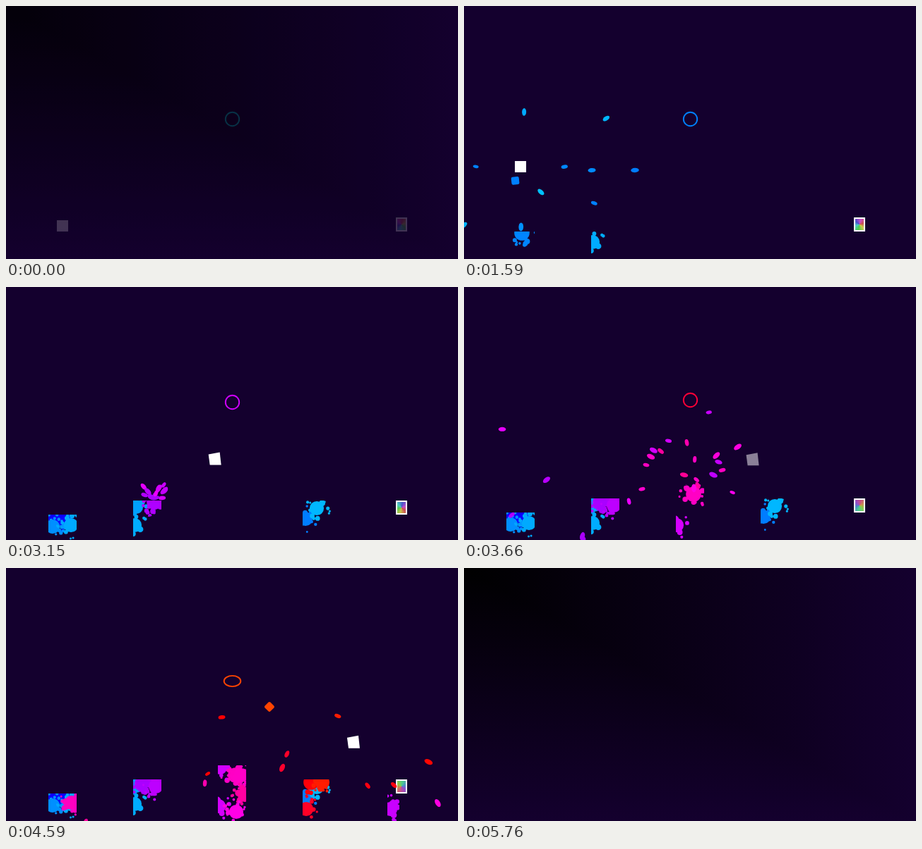
An HTML page with a canvas that plays this animation: 640x359 px, repeating every 5.79 s.

```html
<!DOCTYPE html>
<html lang="en">
<head>
<meta charset="utf-8">
<title>Paint platforms</title>
<style>
  html, body { margin: 0; width: 100%; height: 100%; overflow: hidden; }
  body {
    background: linear-gradient(90deg, #000, #14002e), linear-gradient(#000, #14002e);
    background-blend-mode: lighten;
  }
  canvas { display: block; width: 100vw; height: 100vh; }
</style>
</head>
<body>
<canvas id="stage" width="640" height="359"></canvas>
<script>
const LOOP = 5790, STEP = 30, GRAVITY = 0.0006, TAU = Math.PI * 2;
const RING = { x: 320.5, y: 160.5 };
const stage = document.getElementById('stage');
const g = stage.getContext('2d');

const rnd = n => {
  const s = Math.sin(n * 12.9898) * 43758.5453;
  return s - Math.floor(s);
};
const mix = (a, b, p) => a + (b - a) * p;
const clamp = v => Math.max(0, Math.min(1, v));
const hsl = (h, s = 100, l = 50) => `hsl(${h} ${s}% ${l}%)`;

// hidden columns, 40 wide, rising to the middle one
const columns = [320, 300, 280, 300, 320].map((top, i) => ({ x: 60 + i * 120, top }));

function ringHue(t) {
  const keys = [[0, 182], [1590, 210], [2160, 245], [3150, 289], [3660, 347], [4590, 376], [LOOP, 410]];
  const i = keys.findIndex(k => t <= k[0]) || 1;
  const [a, u] = keys[i - 1], [b, v] = keys[i];
  return mix(u, v, (t - a) / (b - a));
}

// from/to: flight times, via: curve control, at: target, marks: [x, y, flight time] of drops that paint
const shots = [
  { from: 700, to: 1080, via: [200, 170], at: [82, 318], marks: [[182, 335, 210], [424, 326, 1090], [440, 311, 1530], [92, 335, 1640]] },
  { from: 1290, to: 1695, via: [30, 160], at: [72, 320], marks: [[66, 337, 700], [184, 309, 1000]] },
  { from: 1830, to: 2140, via: [100, 180], at: [76, 320], marks: [] },
  { from: 2700, to: 3095, via: [210, 170], at: [210, 298], marks: [[192, 306, 300], [212, 310, 440], [301, 338, 450], [303, 283, 900], [544, 342, 1380]] },
  { from: 3155, to: 3400, via: [330, 200], at: [325, 290], marks: [[333, 294, 500], [338, 322, 560], [326, 346, 620], [93, 333, 900]] },
  { from: 3680, to: 4000, via: [440, 190], at: [432, 300], marks: [[425, 342, 150], [448, 304, 300]] },
  { from: 4430, to: 4830, via: [390, 190], at: [440, 300], marks: [] }
];

const drops = [], splats = [];
shots.forEach(({ to, at: [x, y], marks }, k) => {
  const tint = n => ringHue(to) + (rnd(n) - 0.6) * 24;
  splats.push({ t: to, x, y: y + 4, r: 15, hue: tint(k + 1), seed: k * 90 });
  const add = (vx, vy, n, end) =>
    drops.push({ x, y, t: to, end, vx, vy, r: 3.8 + rnd(n + 1) * 2.4, hue: tint(n) });

  marks.forEach(([mx, my, time], i) => {
    const n = k * 50 + i * 4 + 9;
    add((mx - x) / time, (my - y) / time - GRAVITY * time / 2, n, to + time);
    splats.push({ t: to + time, x: mx, y: my, r: 14, hue: tint(n), seed: n * 31 });
  });
  for (let i = 0; i < 10; i++) {
    const n = k * 70 + i * 5 + 300;
    add((i / 9 - 0.5) * 0.55 + (rnd(n + 2) - 0.5) * 0.1, -0.05 - rnd(n + 3) * 0.32, n, Infinity);
  }
});
splats.sort((a, b) => a.t - b.t);

function dot(x, y, r) {
  g.moveTo(x + r, y);
  g.arc(x, y, r, 0, TAU);
}

function drawSplats(t) {
  g.save();
  g.beginPath();
  for (const c of columns) g.rect(c.x, c.top, 40, 359 - c.top);
  g.clip();
  for (const { t: start, x, y, r, hue, seed } of splats) {
    if (t < start) break;
    g.fillStyle = hsl(hue);
    g.beginPath();
    dot(x, y, r * 0.72);
    for (let i = 0; i < 16; i++) {
      const n = seed + i * 3 + 1;
      const a = rnd(n) * TAU, d = 0.6 + rnd(n + 1) * 0.8;
      dot(x + Math.cos(a) * d * r, y + Math.sin(a) * d * r, r * (0.1 + 0.3 * rnd(n + 2) * (1.5 - d)));
    }
    g.fill();
  }
  g.restore();
}

function drawDrops(t) {
  for (const d of drops) {
    const age = t - d.t;
    if (age <= 0 || t >= d.end) continue;
    const x = d.x + d.vx * age;
    const y = d.y + d.vy * age + GRAVITY * age * age / 2;
    const vy = d.vy + GRAVITY * age;
    const landed = vy > 0 && columns.some(c => x > c.x + 6 && x < c.x + 40 && y > c.top + 10);
    if (landed) continue;
    const r = d.r * clamp(age / 50);
    g.fillStyle = hsl(d.hue);
    g.beginPath();
    g.ellipse(x, y, r, r * 0.56, Math.atan2(vy, d.vx), 0, TAU);
    g.fill();
  }
}

function drawShots(t) {
  for (const { from, to, via, at } of shots) {
    if (t <= from || t >= to) continue;
    const p = (t - from) / (to - from);
    const bend = (a, b, c) => mix(mix(a, b, p), mix(b, c, p), p);
    g.save();
    g.translate(bend(RING.x, via[0], at[0]), bend(RING.y, via[1], at[1]));
    g.rotate((t - from) * 0.0049);
    g.fillStyle = hsl(ringHue(t));
    g.beginPath();
    g.roundRect(-5.5, -5.5, 11, 11, 2);
    g.fill();
    g.restore();
  }
}

function drawRing(t) {
  const shot = shots.find(s => t > s.from && t < s.from + 300);
  const squash = shot ? 0.22 * Math.sin(Math.PI * (t - shot.from) / 300) : 0;
  g.strokeStyle = hsl(ringHue(t));
  g.lineWidth = 1.9;
  g.beginPath();
  g.ellipse(RING.x, RING.y, 9.7 * (1 + squash), 9.7 * (1 - squash), 0, 0, TAU);
  g.stroke();
}

function drawPortal(t) {
  const fill = g.createConicGradient(-2.4, 560, 310);
  for (let i = 0; i <= 6; i++) fill.addColorStop(i / 6, hsl(240 + (t - 1590) * 0.19 + i * 60, 55, 55));
  g.fillStyle = '#fff';
  g.fillRect(552, 300, 16, 20);
  g.fillStyle = fill;
  g.fillRect(554, 302, 12, 16);
}

// a hop on the spot, then one jump from each column to the next
const hop = { t: 1290, time: 600, height: 84, a: columns[0], b: columns[0] };
const jumps = [hop, ...[2080, 2745, 3285, 4370].map((t, i) =>
  ({ t, time: 508, height: 55, a: columns[i], b: columns[i + 1] }))];

function drawPlayer(t) {
  const { t: start, time, height, a, b } = jumps.findLast(j => t >= j.t) || { ...hop, t: Infinity };
  const p = clamp((t - start) / time);
  const flying = p > 0 && p < 1;
  const x = mix(a.x, b.x, p) + 20;
  const y = mix(a.top, b.top, p) - 8 - height * 4 * p * (1 - p);
  const lean = flying && a !== b ? 1 : 0;
  const stretch = flying && p < 0.3 ? 2.5 * Math.sin(Math.PI * p / 0.3) : 0;
  const size = 1 - clamp((t - 4880) / 160);
  const w = 8 - stretch * 0.8, h = 8 + stretch;
  g.save();
  g.translate(x, y);
  g.scale(size, size);
  g.fillStyle = t >= 3640 && t < 3720 ? '#8a8097' : '#fff';
  g.beginPath();
  g.moveTo(-w - lean, -h + lean * (2 + stretch));
  g.lineTo(w - lean, -h - lean);
  g.lineTo(w + lean, h + lean);
  g.lineTo(-w + lean, h + lean);
  g.fill();
  g.restore();
}

// each hit jolts the view left, down, right, up
function shake(t) {
  const hit = shots.find(s => t >= s.to && t < s.to + 120);
  if (!hit) return;
  const a = Math.PI - Math.floor((t - hit.to) / 30) * Math.PI / 2;
  g.translate(Math.round(3 * Math.cos(a)), Math.round(3 * Math.sin(a)));
}

function draw(t) {
  stage.style.opacity = Math.min(clamp(0.2 + t / 500), clamp((5760 - t) / 600));
  g.setTransform(1, 0, 0, 1, 0, 0);
  g.fillStyle = '#14002e';
  g.fillRect(0, 0, 640, 359);
  shake(t);
  drawSplats(t);
  drawPortal(t);
  drawRing(t);
  drawDrops(t);
  drawShots(t);
  drawPlayer(t);
}

const begin = performance.now();
function tick() {
  const t = (performance.now() - begin) % LOOP;
  draw(t < 60 ? 0 : Math.floor(t / STEP) * STEP);
  requestAnimationFrame(tick);
}
tick();
</script>
</body>
</html>
```
